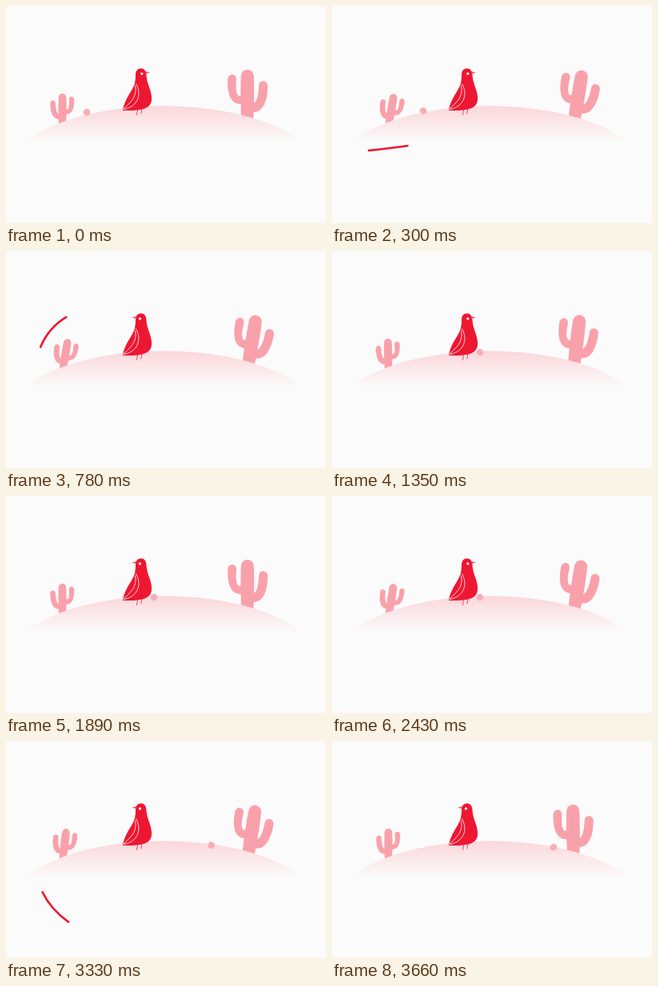
Recreate the animation shown at these times as an HTML page with a canvas. Size 400 px wide and 272 px high, loop 3900 ms.

```html
<!DOCTYPE html>
<html lang="en">
<head>
<meta charset="utf-8">
<title>Bird in the wind</title>
<style>
  html, body { margin: 0; width: 100%; height: 100%; overflow: hidden; background: #fbfbfb; }
  canvas { display: block; width: 400px; height: 272px; }
</style>
</head>
<body>
<canvas id="stage" width="400" height="272"></canvas>
<script>
const ctx = document.getElementById('stage').getContext('2d');
const LOOP = 3900, STEP = 30, LAST = 3660;
const RED = '#ee1731', PINK = '#f9a1ab', SKY = '#fbfbfb';

const clamp = v => Math.max(0, Math.min(1, v));
const easeSine = p => 0.5 - 0.5 * Math.cos(Math.PI * clamp(p));

const hillColor = ctx.createLinearGradient(0, 125, 0, 171);
hillColor.addColorStop(0, '#fbd6da');
hillColor.addColorStop(1, SKY);

// One wind curl around the origin, loop radius about 80
const curl = new Path2D('M-322 147C-200 134 75 110 75 0C75 -41 42 -79 -2 -80' +
  'C-46 -80 -80 -44 -80 0C-80 60 -20 103 60 103C150 103 230 85 320 55');
const CURL_LENGTH = 1250, WIND_SPEED = 2.02;

const body = new Path2D('M162 86C162 81 165 78.3 168.8 78.3C173 78.3 175 81.5 175.4 86' +
  'C176 94 177.8 98 179.8 104C181.8 110 182.8 116 181.5 120.5C179 128.5 170 131.5 146 131' +
  'C146.5 125 150 117 155 109C160 101 162 97 162 86Z');
const wing = new Path2D('M162.5 97.5C168 107 167 117 159.5 124C156 127 151 129 147 129.6' +
  'M161.5 100C163.5 109 160 116 155 121C152.5 124 150 126.5 147 128.6');

function line(path, color, width) {
  ctx.strokeStyle = color;
  ctx.lineWidth = width;
  ctx.lineCap = 'round';
  ctx.stroke(path);
}

function dot(x, y, r, color) {
  ctx.fillStyle = color;
  ctx.beginPath();
  ctx.arc(x, y, r, 0, 2 * Math.PI);
  ctx.fill();
}

// Bends with the gust, then swings back to rest
function lean(t, start, release, amount) {
  if (t < release) return amount * easeSine((t - start) / 260);
  const dt = t - release;
  return amount * Math.exp(-dt / 130) * Math.cos(2 * Math.PI * dt / 500);
}

const cactusParts = [
  'M-7.2 5C-8.4 -25 -8.8 -45 -8 -62C-7.4 -73 7.4 -73 8 -62C8.8 -45 8.4 -25 7.2 5Z',
  'M-24.6 -58C-24 -66 -13.8 -66 -13.8 -58C-14.2 -50 -15 -41 -11 -37.5L0 -38V-28L-8 -27C-22 -27 -25 -42 -24.6 -58Z',
  'M14.4 -51C15 -58 25.4 -57 25.4 -50C25.4 -34 21 -17 8 -17L0 -18V-28L8 -28C13 -31 14 -42 14.4 -51Z'
].map(d => new Path2D(d));

function cactus(x, y, sx, sy, degrees) {
  ctx.save();
  ctx.translate(x, y);
  ctx.rotate(degrees * Math.PI / 180);
  ctx.scale(sx, sy);
  ctx.fillStyle = PINK;
  for (const part of cactusParts) ctx.fill(part);
  ctx.restore();
}

function drawCacti(t) {
  const first = t < 2160;
  const small = first ? lean(t, 0, 1200, 9.5) : lean(t, 2160, 3300, 9.2);
  const big = first ? lean(t, 0, 1320, 9.3) : lean(t, 2160, 3340, 8.7);
  cactus(70.5, 152, -0.6, 0.6, small);
  cactus(301.7, 150, 1, 1, big);
}

function drawHill() {
  ctx.fillStyle = hillColor;
  ctx.beginPath();
  ctx.ellipse(197, 215.2, 200, 90, 0, Math.PI, 2 * Math.PI);
  ctx.fill();
}

function drawBall(t) {
  const x = 101 + 84 * easeSine(t / 1165) + 92 * easeSine((t - 2600) / 1060);
  const y = 127 + 0.0008 * (x - 189) ** 2;
  ctx.save();
  ctx.translate(x, y);
  ctx.rotate((x - 101) / 4.4);
  dot(0, 0, 4.4, '#f8b4bc');
  const scribble = new Path2D();
  scribble.arc(0.4, -0.2, 2.3, 0, 4.6);
  line(scribble, '#f59aa6', 0.8);
  ctx.restore();
}

function facesLeft(t) {
  return (t >= 660 && t < 1200) || (t >= 1800 && t < 2300) || t >= 2800;
}

function drawBird(t) {
  line(new Path2D('M164.6 130L163.4 136.5M169.8 129L168.9 135'), '#ef4a5e', 1);
  ctx.fillStyle = RED;
  ctx.fill(body);
  line(wing, '#fde3e6', 0.9);
  ctx.save();
  if (facesLeft(t)) {
    ctx.translate(337.2, 0);
    ctx.scale(-1, 1);
  }
  ctx.fillStyle = '#ef4a5e';
  ctx.fill(new Path2D('M174 82L180 83.2L174.5 85Z'));
  dot(169.8, 84.8, 1.6, '#fff');
  ctx.restore();
}

function streak(x, y, scale, length, age) {
  const head = age * WIND_SPEED;
  if (head <= 0 || head - length > CURL_LENGTH) return;
  ctx.save();
  ctx.translate(x, y);
  ctx.scale(scale, scale);
  ctx.setLineDash([length, 5000]);
  ctx.lineDashOffset = length - head;
  line(curl, RED, 2.7 / scale);
  ctx.restore();
}

function drawWind(t) {
  for (const gust of [242, 2732]) {
    streak(261, 67, 0.81, 60, t - gust);
    streak(117, 152, 1, 50, t - gust - 210);
  }
}

function render(now) {
  const t = Math.min(LAST, Math.floor((now % LOOP) / STEP) * STEP);
  ctx.fillStyle = SKY;
  ctx.fillRect(0, 0, 400, 272);
  drawCacti(t);
  drawHill();
  drawBall(t);
  drawBird(t);
  drawWind(t);
}

const begin = performance.now();
function tick() {
  render(performance.now() - begin);
  requestAnimationFrame(tick);
}
tick();
</script>
</body>
</html>
```
